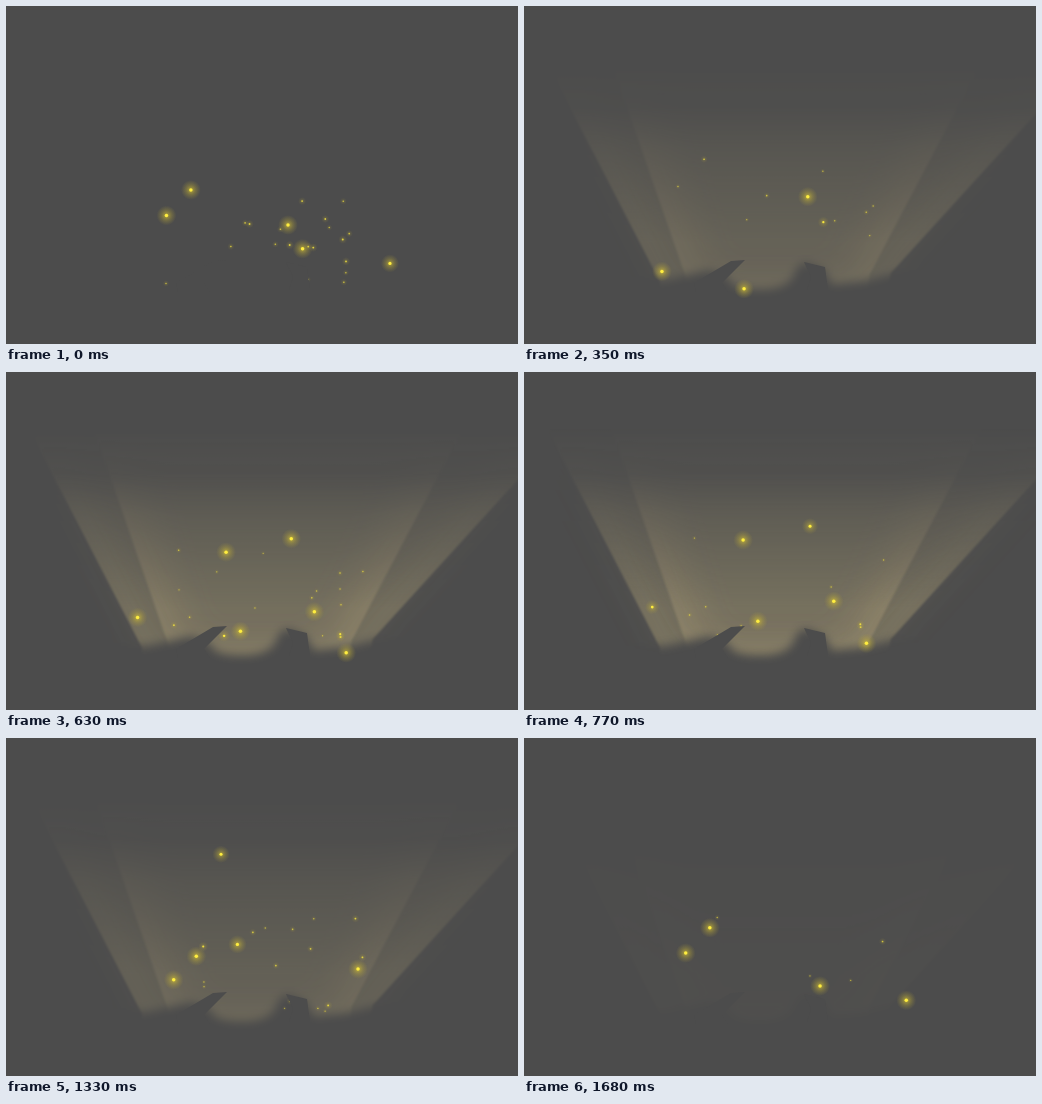
Animation of 512x338 px, one loop 1750 ms. Source, as an HTML page with a canvas:

```html
<!DOCTYPE html>
<html lang="en">
<head>
<meta charset="utf-8">
<title>Fireflies in the light</title>
<style>
  html, body { margin: 0; width: 100%; height: 100%; overflow: hidden; background: #4c4c4c; }
  svg, canvas { position: absolute; left: 0; top: 0; width: 512px; height: 338px; }
  .beam { fill: #f0d996; fill-opacity: .15; }
  .rim { fill: none; stroke: #f0d996; stroke-opacity: .13; stroke-width: 44; filter: url(#wide); }
</style>
</head>
<body>
<svg id="light" viewBox="0 0 512 338" opacity="0">
  <defs>
    <linearGradient id="fade" x1="0" y1="0" x2="0" y2="1">
      <stop offset=".16" stop-color="#fff" stop-opacity="0"/>
      <stop offset=".3" stop-color="#fff" stop-opacity=".11"/>
      <stop offset=".42" stop-color="#fff" stop-opacity=".46"/>
      <stop offset=".7" stop-color="#fff"/>
    </linearGradient>
    <filter id="soft"><feGaussianBlur stdDeviation="1.3"/></filter>
    <filter id="mid"><feGaussianBlur stdDeviation="5"/></filter>
    <filter id="wide" x="-20%" y="-20%" width="140%" height="140%"><feGaussianBlur stdDeviation="18"/></filter>
    <path id="outer" d="M22 55L136 276V300H360L367 267L560 55Z"/>
    <path id="inner" d="M87 55L162 272V300H342L346 268L458 55Z"/>
    <clipPath id="inOuter"><use href="#outer"/></clipPath>
    <clipPath id="inInner"><use href="#inner"/></clipPath>
    <mask id="shade" maskUnits="userSpaceOnUse" x="0" y="0" width="512" height="338">
      <rect width="512" height="338" fill="url(#fade)"/>
      <path d="M-20 274H140L185 264L204 270Q205 283 236 283Q266 283 271 266Q274 256 284 257L300 264L308 278L340 275L368 268H540V360H-20Z" filter="url(#mid)"/>
    </mask>
  </defs>
  <g mask="url(#shade)">
    <use href="#outer" class="beam" style="fill-opacity:.05" filter="url(#wide)"/>
    <g filter="url(#soft)"><g clip-path="url(#inOuter)">
      <use href="#outer" class="beam"/><use href="#outer" class="rim"/>
    </g></g>
    <g filter="url(#soft)"><g clip-path="url(#inInner)">
      <use href="#inner" class="beam" style="fill-opacity:.08"/><use href="#inner" class="rim"/>
    </g></g>
  </g>
</svg>
<canvas id="dots" width="512" height="338"></canvas>
<svg viewBox="0 0 512 338" fill="#4c4c4c">
  <path d="M170 277L207 255L221 254L198 277L204 286L172 286Z"/>
  <path d="M280 256L301 261L304 284L283 284L287 271Z"/>
</svg>
<script>
const LOOP = 1750, STEP = 70;
const ctx = document.getElementById('dots').getContext('2d');
const light = document.getElementById('light');

let seed = 7;
const rnd = (lo, hi) => lo + (hi - lo) * (seed = seed * 16807 % 2147483647) / 2147483647;

// Bright sparks: birthplace x, y, time of birth and death
const sparks = [
  [282, 219, 0, 1040], [141, 275, 210, 1000], [221, 292, 210, 800],
  [221, 192, 490, 1620], [235, 269, 490, 1650], [338, 290, 490, 1740], [307, 250, 490, 1200],
  [192, 229, 1190, 2160], [170, 252, 1190, 2120], [295, 258, 1540, 2250], [379, 272, 1540, 2060]
].map(([x, y, born, end]) => ({ x, y, born, end, size: 1 }));

// Small sparks rise in three waves
for (const born of [0, 490, 1190]) {
  for (let i = 0; i < 20; i++) {
    sparks.push({ x: rnd(160, 355), y: rnd(190, 285), born, end: born + rnd(100, 560), size: rnd(.1, .35) });
  }
}

function disc(x, y, r, fill) {
  ctx.fillStyle = fill;
  ctx.beginPath();
  ctx.arc(x, y, r, 0, 7);
  ctx.fill();
}

function drawSpark({ x: x0, y: y0, born, end, size }, t) {
  if (t < born || t >= end) return;
  // Everything spreads away from a point far below the stage
  const k = Math.exp(.000188 * (t - born));
  const x = 256 + (x0 - 256) * k, y = 635 + (y0 - 635) * k;
  const s = size * Math.min(1, (end - t) / 350), r = 2.5 + 7.5 * s;
  const halo = ctx.createRadialGradient(x, y, 0, x, y, r);
  halo.addColorStop(0, `rgba(225,205,50,${.2 + .5 * s})`);
  halo.addColorStop(.5, `rgba(190,172,55,${.08 + .25 * s})`);
  halo.addColorStop(1, 'rgba(170,155,60,0)');
  disc(x, y, r, halo);
  disc(x, y, .65 + 1.1 * s, `rgba(255,238,64,${Math.min(1, .5 + s)})`);
}

function frame() {
  const t = Math.floor(performance.now() % LOOP / STEP) * STEP;
  // Swells a little faster than it dies away
  light.setAttribute('opacity', Math.sin(Math.PI * (t / LOOP) ** .9) ** 1.3);
  ctx.clearRect(0, 0, 512, 338);
  for (const spark of sparks) {
    drawSpark(spark, t);
    drawSpark(spark, t + LOOP);
  }
  requestAnimationFrame(frame);
}
frame();
</script>
</body>
</html>
```
